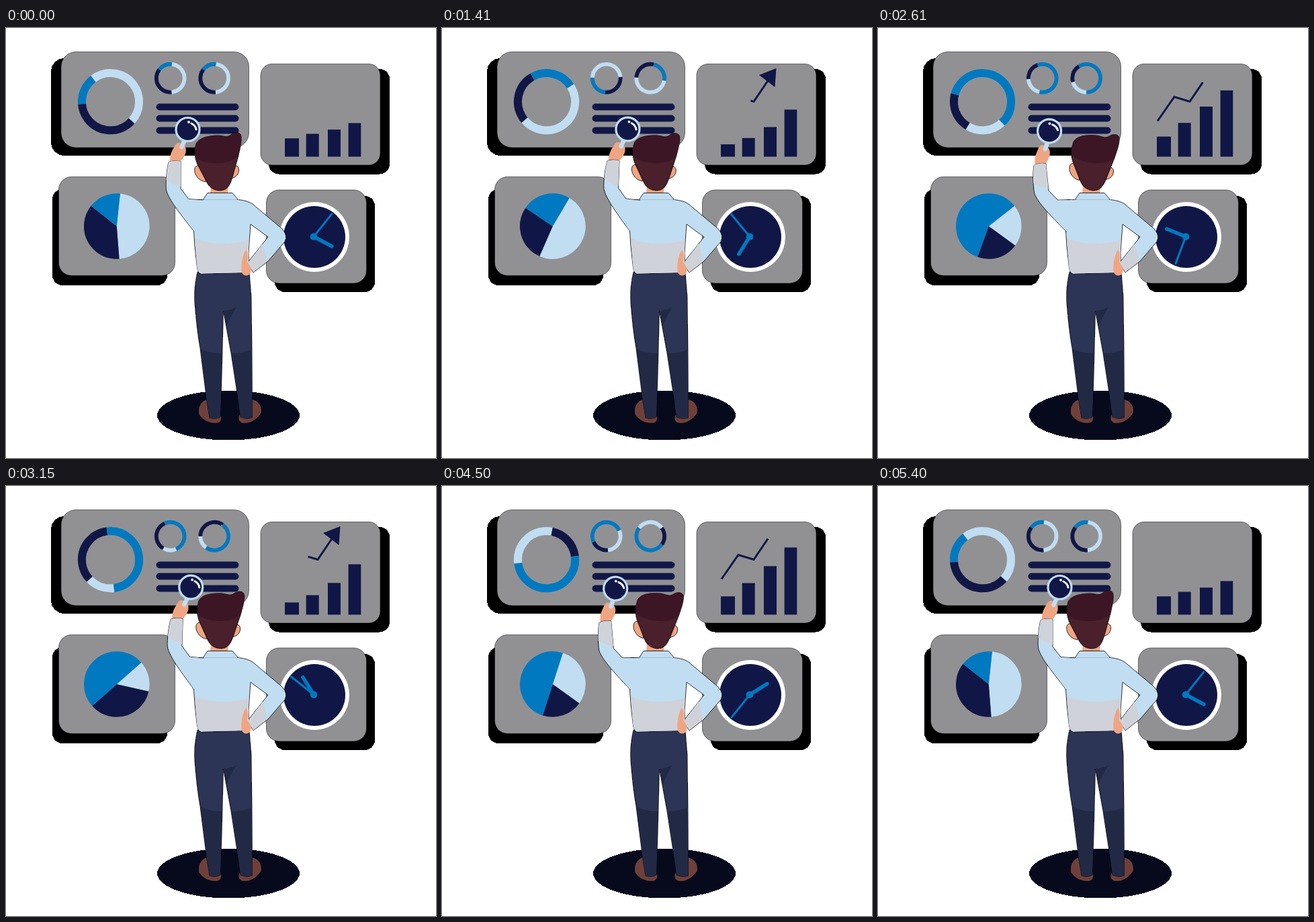
Animation of 640x640 px, one loop 5.43 s. Source, as an HTML page:

```html
<!DOCTYPE html>
<html lang="en">
<head>
<meta charset="utf-8">
<title>Dashboard review</title>
<style>
  html, body { margin: 0; width: 100%; height: 100%; overflow: hidden; background: #fff; }
  svg { display: block; width: 100vw; height: 100vh; }
  .panel { fill: #919193; stroke: #000; stroke-width: .5; }
  .navy { fill: #101746; }
  .sky { fill: #c1ddf2; }
  .cloth { fill: #d0d2da; }
  .skin { fill: #f0a582; }
  .edge { stroke: #000; stroke-width: .8; stroke-linejoin: round; }
  .edge, .crisp { shape-rendering: crispEdges; }
  .shade { fill: #222945; }
</style>
</head>
<body>
<svg viewBox="0 0 640 640" xmlns="http://www.w3.org/2000/svg">
  <!-- panels -->
  <rect class="crisp" x="67" y="45" width="282" height="145" rx="20"/>
  <rect class="panel" x="82" y="35.500" width="279.500" height="142.500" rx="22"/>
  <rect class="crisp" x="391" y="61" width="180" height="156.500" rx="15"/>
  <rect class="panel" x="379" y="53.500" width="178" height="150.500" rx="17"/>
  <rect class="crisp" x="69" y="240" width="171" height="143" rx="15"/>
  <rect class="panel" x="78.500" y="221.500" width="173" height="147" rx="19"/>
  <rect class="crisp" x="400" y="250" width="149" height="143" rx="15"/>
  <rect class="panel" x="387.500" y="241" width="149" height="139" rx="19"/>

  <g stroke="#101746" stroke-width="10" stroke-linecap="round">
    <path d="M228.500 117.500H341.500M228.500 134.500H341.500M228.500 152.500H341.500"/>
  </g>
  <g id="charts" fill="none"></g>
  <g id="bars" class="navy"></g>
  <path id="trend" d="M416 138.500L441 102.500L464 109.500L485 78.500" fill="none" stroke="#101746" stroke-width="3"/>
  <path id="arrowHead" class="navy" d="M472 70L497.500 60L495.500 88Z"/>

  <!-- clock -->
  <circle cx="459" cy="311" r="52" fill="#fff"/>
  <circle class="navy" cx="459" cy="311" r="46"/>
  <g fill="#0079c1" stroke="#0079c1" stroke-linecap="round">
    <path id="minute" d="M458 310.500V267.500" stroke-width="3"/>
    <path id="hour" d="M458 310.500V280" stroke-width="5.500"/>
    <circle cx="458" cy="310.500" r="5.300" stroke="none"/>
  </g>

  <!-- legs -->
  <ellipse class="crisp" cx="331" cy="576.500" rx="106" ry="37" fill="#060a1c"/>
  <g fill="#6f4039">
    <path d="M299 553C288 556 285 569 288 576C294 584 302 588 312 588C318 588 321 584 320 578Z"/>
    <path d="M366 553C378 555 382 567 379 574C373 582 365 588 355 588C348 588 345 583 347 577Z"/>
  </g>
  <path class="edge" fill="#2c3556" d="M285 363C281 380 280 395 281 410C283 434 285 455 289 477L299 556L303 580Q311 583 319 579L321 520L323.500 421L335 484L346 556L349 579Q358 583 366.500 580L366 480L365 400L362 363Z"/>
  <path class="shade" d="M289 477Q304 485 321.500 484L321 520L319 579Q311 583 303 580L299 556Z"/>
  <path class="shade" d="M335 484Q352 485 366 478L366.500 580Q358 583 349 579L346 556Z"/>
  <path class="shade" d="M324 421Q334 420 343 416Q334 428 329 444Z"/>

  <!-- torso -->
  <path class="skin" d="M305 232H331L330 248H304Z"/>
  <path class="sky edge" d="M293 256L300 245.500H337L346 256Z"/>
  <path class="sky edge" d="M282 255.500H346Q360 257 367 262L411 299Q420 309 415 318L390 347L368 364L359 350L390 311L364 292L361 335L362.500 364L290 366Q285 364 284 353L281 325L279.500 303Z"/>
  <path class="sky" d="M294 257L300.500 246.500H336.500L345 257Z"/>
  <path d="M292 255.500H347" stroke="#8fa9bd" stroke-width=".6"/>
  <path class="cloth" d="M281 313Q300 321 322 321Q343 321 361.500 315.500L361 335L362 364L290 365.500Q285 364 284 353Z"/>
  <path class="cloth" d="M382 321L360 350L368 363.500L389 347Z"/>
  <path class="skin" d="M357 330C351 340 349 356 351 364C354 370 361 370 364 364L365 358L359 348C361 341 360 334 357 330Z"/>

  <g id="head">
    <path class="skin edge" d="M288 205C278 203 278 218 289 226Q292 228 297 229L300 206Z"/>
    <path class="skin edge" d="M339 205C349 203 349 218 340 222Q337 224 332 225L328 206Z"/>
    <path class="edge" fill="#49202c" d="M283 172C288 163 300 161 312 160C324 159 328 165 336 158C342 154 349 155 350 161C351 170 348 180 346 190L337 222C333 236 329 241 319 242C310 242 303 238 299 230L285 203C281 195 280 182 283 172Z"/>
    <path fill="#3d1626" d="M283 172C288 163 300 161 312 160C324 159 328 165 336 158C342 154 349 155 350 161C351 170 348 180 346 190Q333 203 308 201Q292 200 281.500 193Q280 182 283 172Z"/>
  </g>

  <g id="arm">
    <path class="skin" d="M244 200C243 187 249 180 252 174C256 168 262 171 267 177C269 183 268 189 259 200Z"/>
    <path class="sky edge" d="M293 256L272 254.500L260 239V198.500Q250 196 242 199.500C239 212 237.500 228 238.500 241C242 256 262 280 280 303"/>
    <path class="sky" d="M272 255L294 256.500V306L280 302.500L262 279Z"/>
    <path class="cloth" d="M260 236V198.500Q250 196 242 199.500C240 209 239 217 238.500 226Q248 233 260 236Z"/>
    <path d="M265.500 168L261.500 177" stroke="#c1ddf2" stroke-width="6.500" stroke-linecap="round"/>
    <circle cx="270.500" cy="151" r="17.500" fill="#101746" stroke="#c1ddf2" stroke-width="3.200"/>
    <circle cx="272" cy="140" r="1.900" fill="#fff"/>
    <path d="M276 142Q282 145 283 151" fill="none" stroke="#fff" stroke-width="3" stroke-linecap="round"/>
  </g>
</svg>
<script>
const LOOP = 5400, FRAME = 30, FRAMES = 181, KEY = 900;
const COLORS = ['#c1ddf2', '#101746', '#0079c1'];
// Shares of the circle where the first and second slices end, one key every 900 ms.
const FIRST_END = [.47, .6, .4, .2, .1, .3, .47];
const SECOND_END = [.84, .7, .8, .4, .6, .5, .84];

const $ = id => document.getElementById(id);
const make = (parent, tag, attrs) => {
  const el = document.createElementNS('http://www.w3.org/2000/svg', tag);
  set(el, attrs);
  parent.appendChild(el);
  return el;
};
function set(el, attrs) {
  for (const name in attrs) el.setAttribute(name, attrs[name]);
}
const rotate = (el, angle, x, y) => set(el, { transform: `rotate(${angle} ${x} ${y})` });

const ease = x => {
  const s = Math.min(1, Math.max(0, x));
  return s * s * (3 - 2 * s);
};
// Eased swing 0 -> 1 -> 0 over two keys.
const swing = (t, half = KEY) => {
  const p = (t / half) % 2;
  return ease(p < 1 ? p : 2 - p);
};
const keyed = (keys, t) => {
  const i = Math.min(keys.length - 2, Math.floor(t / KEY));
  return keys[i] + (keys[i + 1] - keys[i]) * ease(t / KEY - i);
};

const turn = t => 360 * t / LOOP;
const charts = [
  { x: 155.5, y: 109.7, r: 42.6, width: 12, angle: t => turn(t) - 37 },
  { x: 244.7, y: 74.7, r: 20.9, width: 5.8, angle: t => 6 - turn(t) },
  { x: 310.2, y: 74.7, r: 20.9, width: 5.8, angle: t => 6 + turn(t) },
  { x: 164.8, y: 295, r: 24.4, width: 48.8, angle: t => 6 + 46 * swing(t, LOOP / 2) }
];
for (const c of charts) {
  c.slices = COLORS.map(stroke => make($('charts'), 'circle', {
    cx: c.x, cy: c.y, r: c.r, stroke, 'stroke-width': c.width, pathLength: 360
  }));
}

const bars = [
  { x: 415, width: 21, height: 36.3, lead: 450 },
  { x: 446.7, width: 19, height: 54, lead: 300 },
  { x: 479, width: 19, height: 75, lead: 150 },
  { x: 509.6, width: 18.7, height: 100, lead: 0 }
];
for (const bar of bars) bar.el = make($('bars'), 'rect', { x: bar.x, width: bar.width });

const trendLength = $('trend').getTotalLength();

function drawCharts(t) {
  const ends = [0, 360 * keyed(FIRST_END, t), 360 * keyed(SECOND_END, t), 360];
  for (const c of charts) {
    c.slices.forEach((el, i) => {
      set(el, { 'stroke-dasharray': `${ends[i + 1] - ends[i]} 720`, 'stroke-dashoffset': -ends[i] });
      rotate(el, c.angle(t) - 90, c.x, c.y);
    });
  }
}

function drawTrend(t) {
  const p = t % (2 * KEY);
  const from = trendLength * ease(p / KEY - 1), to = trendLength * ease(p / KEY);
  set($('trend'), {
    'stroke-dasharray': `${to - from} 400`,
    'stroke-dashoffset': -from,
    visibility: to - from > .01 ? 'visible' : 'hidden'
  });
  const size = Math.min(ease((p - 900) / 300), ease((1800 - p) / 300));
  set($('arrowHead'), { transform: `translate(485 78.5) scale(${size}) translate(-485 -78.5)` });
}

function draw(t) {
  drawCharts(t);
  drawTrend(t);
  for (const { el, height, lead } of bars) {
    const h = height * (.5 + .5 * swing(t + lead));
    set(el, { y: 191.5 - h, height: h });
  }
  rotate($('minute'), 38.5 + 3 * turn(t), 458, 310.5);
  rotate($('hour'), 118 + turn(t), 458, 310.5);
  rotate($('head'), 6.2 * swing(t), 320, 250);
  rotate($('arm'), 10.1 * (swing(300) - swing(t + 300)), 285, 297);
}

const start = performance.now();
function tick() {
  const frame = Math.floor((performance.now() - start) / FRAME) % FRAMES;
  draw(frame * FRAME % LOOP);
  requestAnimationFrame(tick);
}
tick();
</script>
</body>
</html>
```
